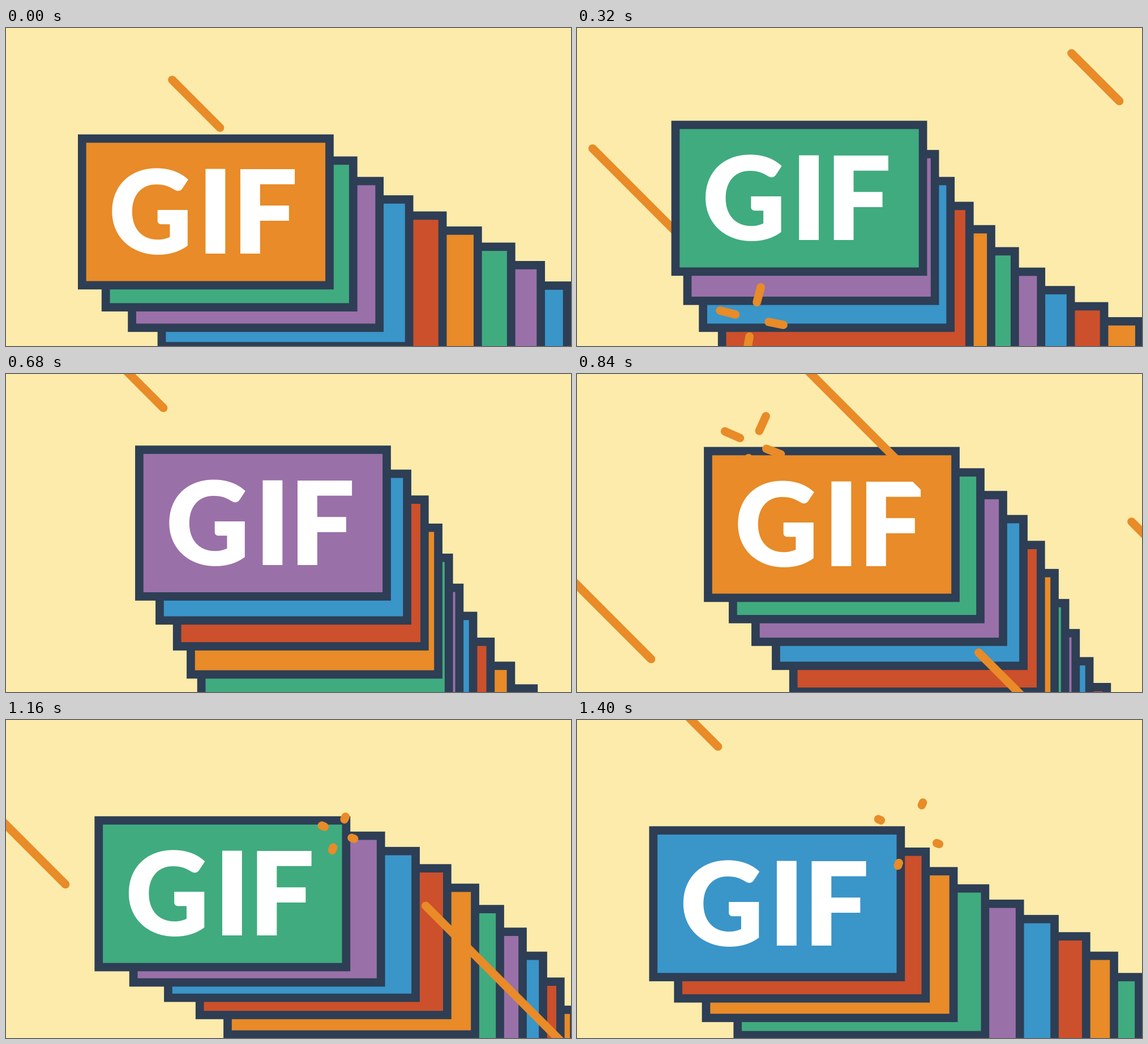
Write an HTML page with a canvas that moves like this. It is 998 px wide and 561 px high and loops after 1440 ms.

```html
<!DOCTYPE html>
<html lang="en">
<head>
<meta charset="utf-8">
<title>GIF</title>
<style>
  html, body { margin: 0; width: 100%; height: 100%; overflow: hidden; background: #fcebaa; }
  canvas { display: block; }
</style>
</head>
<body>
<canvas id="stage" width="998" height="561"></canvas>
<script>
const W = 998, H = 561, STEP = 40, STEPS = 36;
const NAVY = '#2d3e55', ORANGE = '#e88b28', SAND = '#fcebaa';
const FILLS = [ORANGE, '#40ab7f', '#9a70a8', '#3a95c9', '#cc502b'];
const CARD = { w: 451.8, h: 273.5, edge: 14.7, count: 12, shift: 40 };
const LETTERS = [['G', 59.5], ['I', 225], ['F', 286.5]];

const ctx = document.getElementById('stage').getContext('2d');
const mod = (a, n) => ((a % n) + n) % n;
// signed distance in steps on the loop
const since = (n, at) => mod(n - at + STEPS / 2, STEPS) - STEPS / 2;

// cubic-bezier(.5, 0, .5, 1)
function ease(x) {
  let lo = 0, hi = 1;
  for (let i = 0; i < 24; i++) {
    const t = (lo + hi) / 2;
    if (1.5 * t * (1 - t) + t ** 3 < x) lo = t; else hi = t;
  }
  return lo * lo * (3 - 2 * lo);
}

// the deck swings between two points, there and back in one loop
function swing(n) {
  const p = mod(n, STEPS) / 18;
  const e = ease(p > 1 ? 2 - p : p);
  return [127 + 101.5 * e, 187.7 - 61.7 * e];
}

function drawCards(n) {
  const born = Math.floor(n / 2), { w, h, edge } = CARD;
  for (let k = CARD.count - 1; k >= 0; k--) {
    const [px, py] = swing(n - 2 * k);
    const x = px + k * CARD.shift, y = py + k * CARD.shift;
    ctx.fillStyle = NAVY;
    ctx.fillRect(x, y, w, h);
    ctx.fillStyle = FILLS[mod(k - born, 5)];
    ctx.fillRect(x + edge, y + edge, w - 2 * edge, h - 2 * edge);
  }
  const [x, y] = swing(n);
  ctx.font = '900 205px Lato, sans-serif';
  ctx.fillStyle = '#fff';
  for (const [ch, left] of LETTERS) {
    ctx.fillText(ch, x + left + ctx.measureText(ch).actualBoundingBoxLeft, y + 210.4);
  }
}

// diagonal streaks: x - y, step, tail x, head x, tail speed, head speed
const dart = (diag, at, tail) => [diag, at, tail, tail + 84.5, 129, 129];
const BACK = [
  dart(202, 0, 293.5),
  dart(829, 8, 873.5),
  dart(-99, 13, 19.5),
  [-185, 8, 27.5, 277, 43.6, 60],
  [-185, 29, -60, 105, 44, 60]
];
const FRONT = [
  dart(218, 21, 709.5),
  dart(719, 21, 979.5),
  dart(27, 25, 335),
  dart(883, 25, 989.5),
  [-372, 21, -10, 131, 52, 73],
  [413.5, 25, 544.5, 923, 49.2, 73.3]
];

function segment(x1, y1, x2, y2) {
  ctx.beginPath();
  ctx.moveTo(x1, y1);
  ctx.lineTo(x2, y2);
  ctx.stroke();
}

function drawStreaks(list, n) {
  for (const [diag, at, tail, head, vt, vh] of list) {
    const d = since(n, at), a = tail + vt * d, b = head + vh * d;
    if (b > a) segment(a, a - diag, b, b - diag);
  }
}

// bursts: centre, first step, turn
const BURSTS = [[310, 513, 4, -9.5], [311.6, 123.3, 18, 0], [587, 199, 28, 0]];
const ARMS = [[-52.5, -23], [23, -51], [50.5, 19], [-19.3, 55.5]];
const INNER = [.455, .465, .45, .45, .54, .66, .8, .955];
const OUTER = [.46, .555, .8, .96, 1.03, 1.045, 1.045, 1.045];

function drawBursts(n) {
  for (const [x, y, first, turn] of BURSTS) {
    const age = n - first;
    if (age < 0 || age >= INNER.length) continue;
    ctx.save();
    ctx.translate(x, y);
    ctx.rotate(turn * Math.PI / 180);
    for (const [ax, ay] of ARMS) {
      const a = INNER[age], b = OUTER[age];
      segment(ax * a, ay * a, ax * b, ay * b);
    }
    ctx.restore();
  }
}

const CURL = 'M748 96C738 118 720 137 703 136C682 134 686 112 703 97C720 82 742 73 757 74' +
  'C785 77 796 103 791 127C786 157 765 180 746 178C736 177 732 171 733 163';
const curl = new Path2D(CURL);
const probe = document.createElementNS('http://www.w3.org/2000/svg', 'path');
probe.setAttribute('d', CURL);
const curlLength = probe.getTotalLength();

// the curl draws itself, then wipes away from its start
function drawCurl(n) {
  const from = Math.max(0, (n - 13) / 4), to = Math.min(1, (n - 9) / 4);
  if (to <= 0 || from >= 1) return;
  ctx.save();
  if (from > 0 || to < 1) {
    ctx.setLineDash([(to - from) * curlLength, 2 * curlLength]);
    ctx.lineDashOffset = -from * curlLength;
  }
  ctx.stroke(curl);
  ctx.restore();
}

function draw(n) {
  ctx.fillStyle = SAND;
  ctx.fillRect(0, 0, W, H);
  ctx.strokeStyle = ORANGE;
  ctx.lineWidth = 14.7;
  ctx.lineCap = ctx.lineJoin = 'round';
  drawStreaks(BACK, n);
  drawCurl(n);
  drawCards(n);
  drawStreaks(FRONT, n);
  drawBursts(n);
}

const start = performance.now();
function tick() {
  draw(Math.floor((performance.now() - start) / STEP) % STEPS);
  requestAnimationFrame(tick);
}
tick();
</script>
</body>
</html>
```
